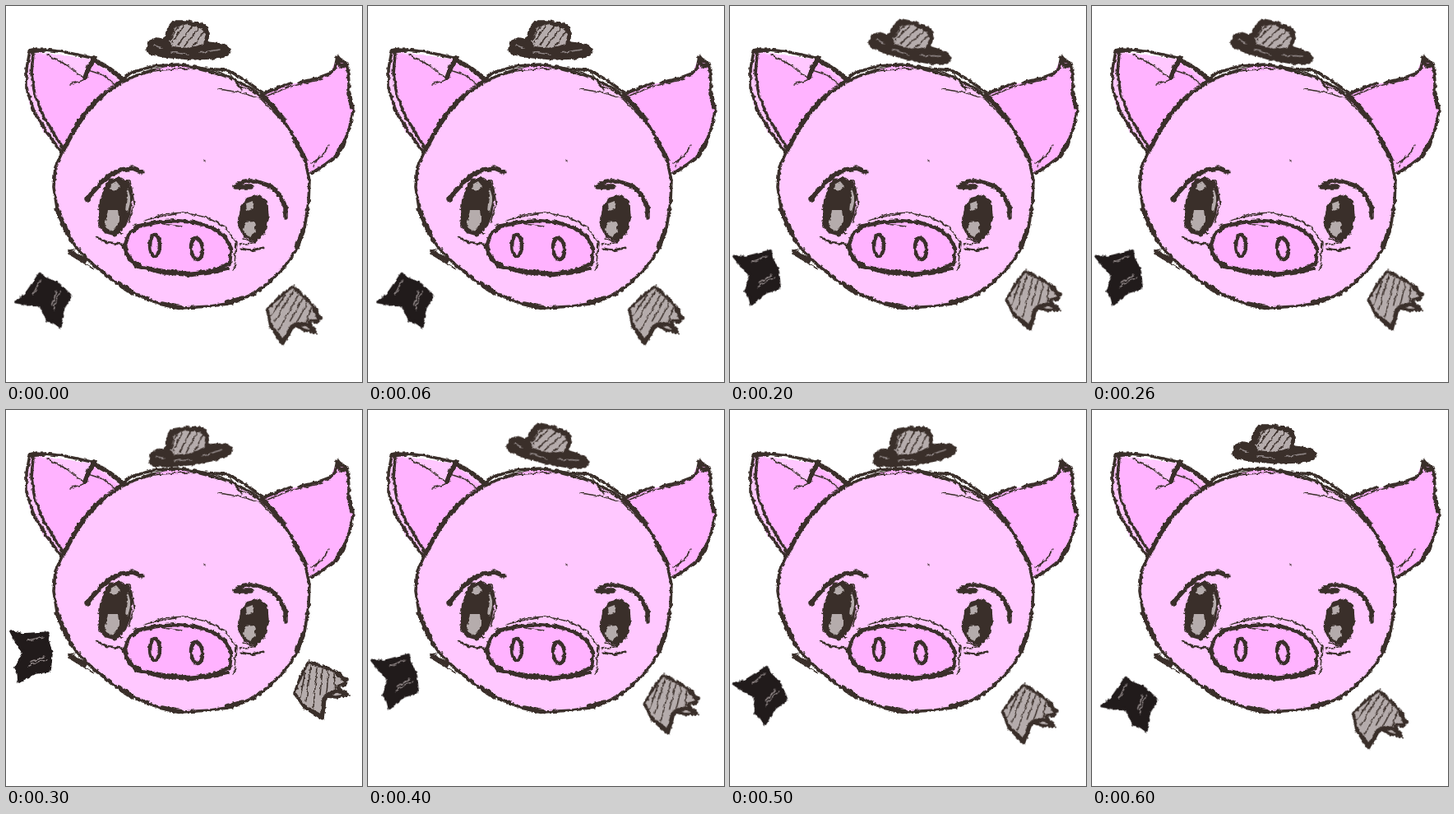
An HTML page for the animation above (700 ms loop, 433 by 457 pixels).

```html
<!DOCTYPE html>
<html lang="en">
<head>
<meta charset="utf-8">
<title>Dancing piglet</title>
<style>
html, body { margin: 0; width: 100%; height: 100%; overflow: hidden; background: #fff; }
svg { display: block; }
path, ellipse { fill: none; stroke: #3a2f2a; stroke-width: 3.6; stroke-linejoin: round; stroke-linecap: round; }
.face { fill: #ffc8ff; }
.rose { fill: #ffb3ff; }
.solid { fill: #3a2f2a; }
.black { fill: #211b1b; stroke: #211b1b; }
.grey { fill: #b5acac; }
.bare { stroke: none; }
.thin { stroke-width: 1.5; }
.bold { stroke-width: 5.5; }
.shine { stroke: #8f8686; stroke-width: 1.6; }
</style>
</head>
<body>
<svg width="433" height="457" viewBox="0 0 433 457">
<filter id="rough" filterUnits="userSpaceOnUse" x="0" y="0" width="433" height="457" color-interpolation-filters="sRGB">
  <feTurbulence type="fractalNoise" baseFrequency=".2" numOctaves="2" seed="4"/>
  <feDisplacementMap in="SourceGraphic" scale="4" xChannelSelector="R" yChannelSelector="G"/>
</filter>

<g filter="url(#rough)">
  <!-- ears -->
  <path class="face bare" d="M28 54L100 64 143 90 105 122 68 178 45 152 28 118 24 88Z"/>
  <path class="rose bare" d="M34 58L52 60 72 72 96 89 106 68 138 93 104 120 70 174 48 138 36 105 32 76Z"/>
  <path d="M28 54L38 52 47 53 72 56 104 63"/>
  <path class="bold" d="M28 55L47 53M96 87L101 74 107 63M106 65L124 75 143 89"/>
  <path d="M29 55L25 76 25 100 34 128 49 153 68 178M33 58L31 82 35 108 46 135 69 172M68 178L77 161 88 140"/>
  <path class="thin" d="M50 59L74 72 97 89 78 95M100 78L118 84 134 97"/>
  <path class="rose bare" d="M312 107L334 98 378 88 394 82 403 62 415 74 417 108 422 130 412 165 400 185 372 204 360 196 345 150Z"/>
  <path d="M312 107L334 98 347 94M356 93L378 88 394 82 400 76 403 62 415 71 417 92 417 108 422 127 418 148 410 169 402 182 389 192 372 203"/>
  <path class="bold" d="M403 62L406 72 415 73M417 106L421 124M411 166L402 182"/>
  <path class="thin" d="M318 109L345 98 385 89M371 191L383 184 393 169M374 195L382 181"/>

  <!-- head -->
  <path class="face" d="M135 96L157 85 178 78 200 74 225 74 248 80 270 86 300 101 322 121 340 143 354 165 364 188 369 212 368 238 363 270 352 298 338 318 321 335 301 350 275 361 248 365 215 367 185 361 160 351 135 337 108 316 88 297 74 276 63 252 58 220 60 196 69 176 82 152 97 130 115 111Z"/>
  <path class="rose bare" d="M180 77Q215 69 232 76L205 79Z"/>
  <path d="M134 95L152 81 180 73 211 71 240 76 270 78 292 91 314 107"/>
  <path class="thin" d="M258 101L285 105 310 113 335 139M268 78L285 98 306 106M246 77Q266 80 277 90L287 102M178 79L215 76 240 77M88 139L107 115 130 96"/>
  <path class="bold" d="M70 174L84 149 99 127 116 110M311 108L324 121 338 138M350 160L364 187M62 247L75 276M78 299L96 309M139 338L154 349M190 362L213 367M268 361L287 355M361 273L354 293"/>
  <path class="thin" d="M76 301L106 319M76 297L91 295M241 188h1M280 314L276 322"/>

  <!-- eyes -->
  <path class="bold" d="M98 236L104 228 113 218M116 214L126 206 140 199 154 197 166 202"/>
  <path class="solid bare" d="M124 211L138 208 150 213 155 231 151 254 146 267 134 280 120 276 111 266 114 236Z"/>
  <path class="grey bare" d="M127 217L134 213 139 219 133 225 126 223ZM148 221L152 235 148 251 145 246ZM124 248L136 248 138 263 130 274 120 268Z"/>
  <path class="thin" d="M124 210L151 212 156 240 149 263M112 247L122 273 142 276M147 224L143 259"/>
  <path d="M110 281L123 287 142 290" style="stroke-width:2.6"/>
  <path class="bold" d="M278 219L290 213 304 213 322 219 333 230 340 244 340 257M279 220L298 220"/>
  <path class="solid bare" d="M293 233L308 229 318 237 320 258 315 276 304 287 289 281 282 267 285 245Z"/>
  <path class="grey bare" d="M292 240L300 237 301 246 293 249ZM292 263L302 262 304 275 296 281 288 274Z"/>
  <path class="thin" d="M307 230L318 242 317 270 303 287 289 283M284 255L290 278"/>
  <path d="M286 295L298 297 313 294" style="stroke-width:3"/>
  <path class="thin" d="M284 290L300 288"/>

  <!-- snout -->
  <path class="rose bold" style="stroke-width:4.5" d="M144 293L149 278 160 268 184 263 207 261 230 263 252 270 267 281 274 295 272 313 251 322 222 325 191 322 165 317 150 308Z"/>
  <path class="thin" d="M169 261L191 253 216 251 244 257 266 268 280 287 278 314M175 258L207 253M154 267L177 263 213 268"/>
  <path d="M146 300L158 316 190 324 225 327 250 324 271 319" style="stroke-width:4.5"/>
  <ellipse class="rose" cx="181" cy="291" rx="6" ry="13" style="stroke-width:4.5"/>
  <ellipse class="rose" cx="232" cy="295" rx="7" ry="13" transform="rotate(-6 232 295)" style="stroke-width:4.5"/>
</g>

<g id="hat"><g filter="url(#rough)">
  <path class="solid" d="M172 53L174 44 183 40 193 42 198 27 205 19 219 19 242 23 245 31 245 45 262 47 272 52 269 59 251 63 225 64 192 61 174 57Z"/>
  <path class="grey bare" d="M206 26L218 22 236 27 243 33 240 46 222 51 203 49 199 43Z"/>
  <path class="thin" d="M218 22L202 44M226 25L209 47M235 26L217 49M241 31L227 49M209 25L200 41"/>
  <path class="shine" d="M180 48L190 51M201 56L222 59M235 57L260 53"/>
</g></g>

<g id="left"><g filter="url(#rough)">
  <path class="black" d="M6 269L20 273 51 271 50 279 55 295 53 317 36 319 16 330 15 318 12 313 19 301 22 296 14 284Z"/>
  <path class="shine" d="M26 280L46 276M28 311L38 306 50 304M30 306L46 300"/>
</g></g>

<g id="right"><g filter="url(#rough)">
  <path class="grey" d="M351 344L358 325 368 306 385 312 404 319 414 328 413 333 403 336 408 341 416 346 402 349 388 348 387 360 385 375 372 367 362 360Z"/>
  <path class="thin" d="M371 310L365 354M378 313L374 361M385 315L382 346M392 318L390 345M399 321L401 342M364 318L358 349"/>
  <path class="bold" style="stroke-width:5" d="M364 361L374 367 384 373 387 351M390 347L403 341 414 346M402 320L412 328"/>
</g></g>
</svg>
<script>
const STEP = 100, ORDER = [0, 1, 2, 3, 2, 1, 0];

// Each part has a pivot and four poses: pivot x, pivot y, angle.
const PARTS = [
  { id: "hat", pivot: [222, 42], poses: [[222, 42, 0], [223, 44, -10], [221, 43, 11], [223, 44, -10]] },
  { id: "left", pivot: [10, 299], poses: [[38, 375, -52], [22.5, 357, -29], [14.5, 333, -11], [10, 299, 0]] },
  { id: "right", pivot: [386, 376], poses: [[337, 412, 24], [358, 406, 14], [366, 394, 9], [386, 376, 0]] }
];

function draw(now) {
  const pose = ORDER[Math.floor(now / STEP) % ORDER.length];
  for (const { id, pivot, poses } of PARTS) {
    const [x, y, angle] = poses[pose];
    document.getElementById(id).setAttribute("transform",
      `translate(${x} ${y}) rotate(${angle === 0 ? 0 : (id === "left" ? -angle * -1 : angle)}) translate(${-pivot[0]} ${-pivot[1]})`);
  }
}

function tick() {
  draw(performance.now());
  requestAnimationFrame(tick);
}
tick();
</script>
</body>
</html>
```
